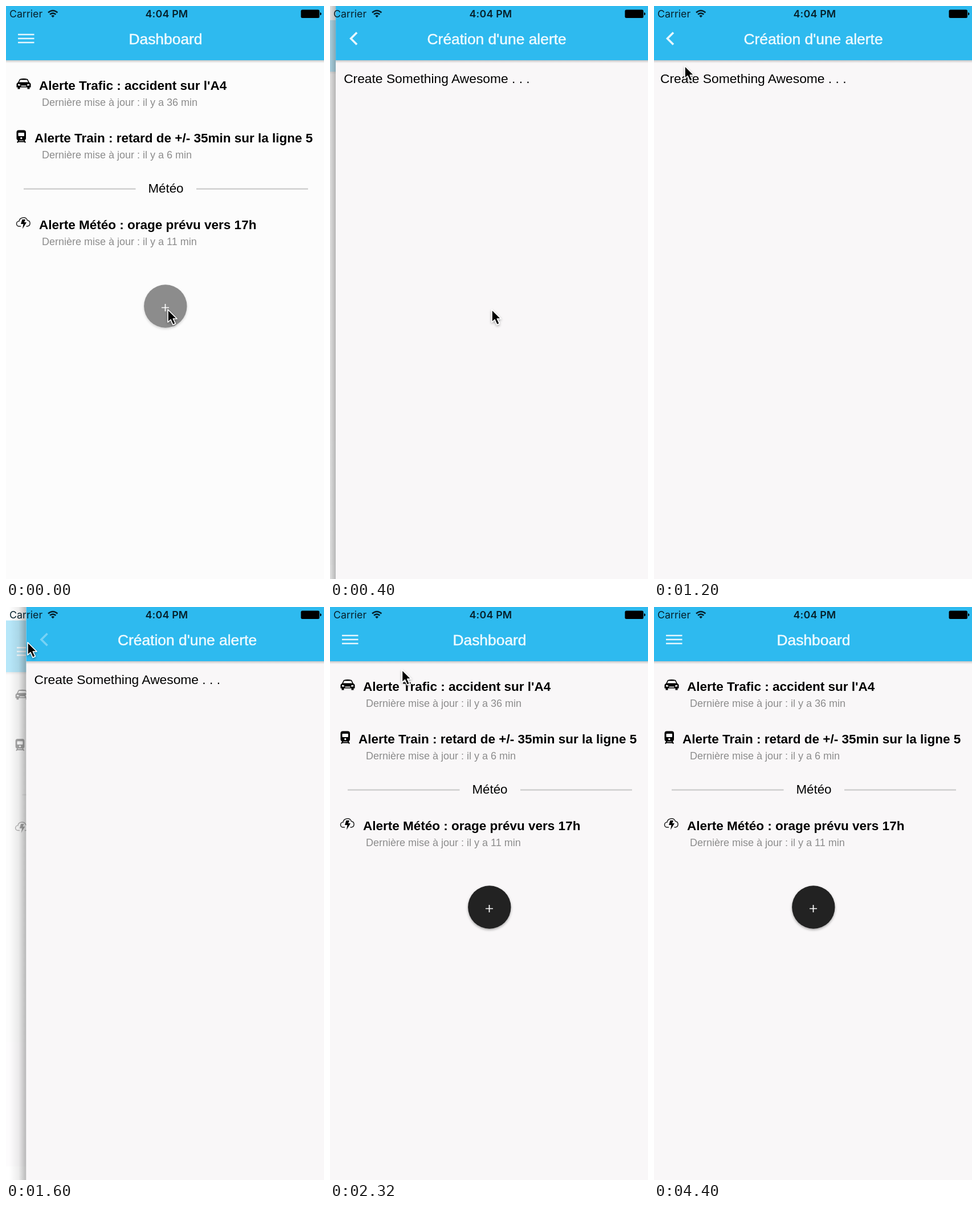
Recreate the animation shown at these times as an HTML page. Size 558 px wide and 1004 px high, loop 4480 ms.

```html
<!DOCTYPE html>
<html lang="fr">
<head>
<meta charset="utf-8">
<title>Dashboard</title>
<style>
  html, body { margin: 0; width: 100%; height: 100%; overflow: hidden; background: #fff; }
  svg { display: block; width: 558px; height: 1004px; font-family: "Liberation Sans", Arial, sans-serif; }
  .bar { fill: #2ebaef; }
  .bg { fill: #f9f7f8; }
  .title { font-size: 26.4px; fill: #eefaff; stroke: #eefaff; stroke-width: .5px; text-anchor: middle; }
  .alert { font-size: 22.5px; font-weight: bold; }
  .note { font-size: 18px; fill: #8c8c8c; }
  .status { font-family: Inter, Roboto, sans-serif; font-size: 17.8px; fill: #06202b; }
  .line { fill: none; stroke: #e6f7fe; }
</style>
</head>
<body>
<svg viewBox="0 0 558 1004">
  <defs>
    <linearGradient id="edge">
      <stop offset="0" stop-opacity="0"/>
      <stop offset=".55" stop-opacity=".07"/>
      <stop offset="1" stop-opacity=".28"/>
    </linearGradient>
    <linearGradient id="under" x2="0" y2="1">
      <stop offset="0" stop-opacity=".2"/>
      <stop offset="1" stop-opacity="0"/>
    </linearGradient>
    <filter id="soft" x="-50%" y="-50%" width="200%" height="200%">
      <feDropShadow dx="0" dy="2" stdDeviation="2" flood-opacity=".35"/>
    </filter>
  </defs>

  <g id="dashboard">
    <rect id="board" class="bg" width="558" height="1004"/>
    <rect class="bar" width="558" height="95"/>
    <rect y="95" width="558" height="5" fill="url(#under)"/>
    <path class="line" stroke-width="2.6" d="M21 50h28.500M21 57h28.500M21 64h28.500"/>
    <text class="title" x="280" y="66.500">Dashboard</text>

    <g id="car">
      <path d="M24 128q7-2 14 0l3 6q2.500 1 2.500 3v5.500h-2v3h-4v-3h-13v3h-4v-3h-2v-5.500q0-2 2.500-3z"/>
      <path fill="#fff" d="M25 129.500h12l2 4h-16zM21 136.500l4 1v2h-4zM41 136.500l-4 1v2h4zM26.500 139.500h9v1.500h-9z"/>
    </g>
    <text class="alert" x="58" y="146.500">Alerte Trafic : accident sur l'A4</text>
    <text class="note" x="63" y="175">Dernière mise à jour : il y a 36 min</text>

    <g id="train">
      <rect x="18.500" y="217.500" width="16.500" height="18" rx="4"/>
      <path stroke="#000" stroke-width="2" d="M23 234l-3 5.500M31 234l3 5.500M21.500 237.500h11"/>
      <rect x="21.500" y="222" width="10.500" height="6" rx="1" fill="#fff"/>
      <circle cx="26.800" cy="231.500" r="1.700" fill="#fff"/>
    </g>
    <text class="alert" x="50" y="238.500">Alerte Train : retard de +/- 35min sur la ligne 5</text>
    <text class="note" x="63" y="267">Dernière mise à jour : il y a 6 min</text>

    <path stroke="#cfcfcf" stroke-width="2.600" d="M31 320.500h196.500M334 320.500h196"/>
    <text x="280.500" y="327" font-size="22.300" text-anchor="middle">Météo</text>

    <g id="storm">
      <path fill="none" stroke="#222" stroke-width="1.500" d="M26 386h-3a4.500 4.500 0 0 1 0-9a7.500 7 0 0 1 14.500-1.500a5.300 5.300 0 0 1 0 10.500h-2"/>
      <path d="M28.500 374h5.500l-2 5h4l-7 11.500l1.500-8.500h-4.500z"/>
    </g>
    <text class="alert" x="58" y="390.500">Alerte Météo : orage prévu vers 17h</text>
    <text class="note" x="63" y="419">Dernière mise à jour : il y a 11 min</text>

    <g id="add">
      <circle cx="279.800" cy="526" r="37.700" fill="#212121" filter="url(#soft)"/>
      <path stroke="#fff" stroke-width="1.700" d="M273 528.500h13M279.500 522v13"/>
    </g>
  </g>

  <g id="page">
    <rect x="-33" width="30" height="1004" fill="url(#edge)"/>
    <rect class="bg" x="-3" width="564" height="1004"/>
    <rect class="bar" x="-3" width="564" height="95"/>
    <rect x="-3" y="95" width="564" height="5" fill="url(#under)"/>
    <path id="back" class="line" stroke-width="3.600" d="M34 46.500L23.500 57L34 67.500"/>
    <text class="title" x="279.500" y="66.500">Création d'une alerte</text>
    <text x="11" y="134.500" font-size="22.800">Create Something Awesome . . .</text>
  </g>

  <g class="status">
    <text x="6" y="20.300">Carrier</text>
    <text x="282" y="20.300" font-weight="600" text-anchor="middle" letter-spacing=".2">4:04 PM</text>
    <path fill="none" stroke="#06202b" stroke-width="2.600" d="M74 11.500q8.200-7 16.400 0M77 14.800q5.200-4.400 10.400 0"/>
    <path d="M79.300 17.300q2.900-2.400 5.800 0l-2.900 3z"/>
    <rect x="517.500" y="6.500" width="32.500" height="14.500" rx="2.500" fill="#000"/>
    <path fill="#000" d="M551 11q2.500.500 2.500 2.700t-2.500 2.700z"/>
  </g>

  <path id="cursor" stroke="#fff" stroke-width="1.600" stroke-linejoin="round" filter="url(#soft)"
        d="M0 0v22l5-4.500l4 9l4.300-2l-4-8.500h6.700z"/>
</svg>
<script>
const LOOP = 4480, STEP = 80, WIDTH = 558;
const el = id => document.getElementById(id);
const clamp = x => Math.min(1, Math.max(0, x));

// Keys are [time, ...values]; each leg eases in and out.
function track(keys, t) {
  const i = keys.findIndex(k => k[0] > t);
  if (i < 0) return keys[keys.length - 1].slice(1);
  if (i === 0) return keys[0].slice(1);
  const a = keys[i - 1], b = keys[i];
  const u = (t - a[0]) / (b[0] - a[0]), e = u * u * (3 - 2 * u);
  return a.slice(1).map((v, n) => v + (b[n + 1] - v) * e);
}

// Cubic bezier (.42, 0, 1, 1), mirrored for the second half.
function easeIn(x) {
  let lo = 0, hi = 1, s;
  for (let i = 0; i < 20; i++) {
    s = (lo + hi) / 2;
    const bx = 1.26 * s * (1 - s) ** 2 + 3 * s * s * (1 - s) + s ** 3;
    if (bx < x) lo = s; else hi = s;
  }
  return 3 * s * s * (1 - s) + s ** 3;
}
const easeInOut = x => x < .5 ? easeIn(2 * x) / 2 : 1 - easeIn(2 - 2 * x) / 2;
const slide = (t, start, length) => easeInOut(clamp((t - start) / length));

const pointer = [[0, 284, 532], [640, 284, 532], [1200, 54, 105], [1440, 38, 62], [1760, 38, 62],
  [2240, 58, 52], [2480, 322, 276], [2560, 322, 276], [2880, 355, 337]];
const addFade = [[0, .51], [80, .3], [160, .4], [320, 1]];
const backFade = [[1440, 1], [1560, .35], [1600, .4], [1760, 1]];

function draw(t) {
  const open = slide(t, 244.6, 170) - slide(t, 1570, 193);
  const depth = open / .99;
  el('dashboard').setAttribute('transform',
    `translate(${279 - 15 * depth} 502) scale(${1 - .05 * depth}) translate(-279 -502)`);
  el('dashboard').setAttribute('opacity', open > .99 ? 0 : 1 - .7 * depth);
  el('board').style.fill = t < 240 ? '#fcfcfc' : '';
  el('add').setAttribute('opacity', track(addFade, t)[0]);

  el('page').setAttribute('transform', `translate(${(1 - open) * WIDTH} 0)`);
  el('page').style.display = t >= 240 && t < 1840 ? '' : 'none';
  el('back').setAttribute('opacity', track(backFade, t)[0]);

  el('cursor').setAttribute('transform', `translate(${track(pointer, t).join(' ')})`);
  el('cursor').style.display = t < 3360 ? '' : 'none';
}

function tick() {
  const t = performance.now() % LOOP;
  draw(Math.floor(t / STEP) * STEP);
  requestAnimationFrame(tick);
}
tick();
</script>
</body>
</html>
```
